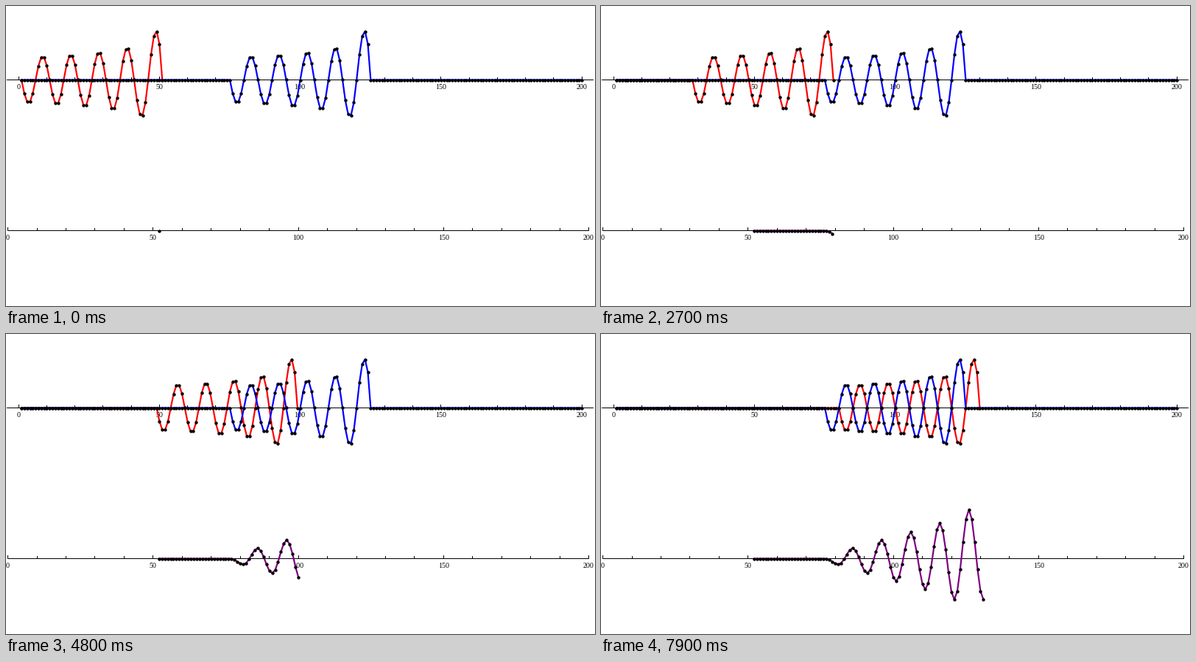
Animation, 800 px wide and 408 px high, one loop 8 s. Source, as a matplotlib script:

```python
import numpy as np
import matplotlib.pyplot as plt
from matplotlib.animation import FuncAnimation

W, H, DPI = 800, 408, 100
FRAMES = 80
PX = 72 / DPI  # points per pixel

TOP, BOTTOM = 100.5, 305.5
TOP_X0, TOP_STEP = 17.2, 3.825
BOT_X0, BOT_STEP = 2.6, 3.945

fig = plt.figure(figsize=(W / DPI, H / DPI), dpi=DPI, facecolor="white")
ax = fig.add_axes([0, 0, 1, 1])
ax.set_xlim(0, W)
ax.set_ylim(H, 0)
ax.axis("off")


def top_x(i):
    return TOP_X0 + TOP_STEP * np.asarray(i)


def bottom_x(i):
    return BOT_X0 + BOT_STEP * np.asarray(i)


def draw_axis(y, to_x, left, right):
    # Coordinates already sit on pixel centres, so snapping stays off
    style = dict(color="black", lw=PX, solid_capstyle="butt",
                 snap=False, zorder=1)
    ax.plot([left, right], [y, y], **style)
    for v in range(0, 201, 10):
        x = np.floor(to_x(v)) + 0.5
        major = v % 50 == 0
        ax.plot([x, x], [y, y - (4.5 if major else 3.5)], **style)
        if major:
            ax.text(x - 0.4, y + 12.1, str(v), ha="center", va="baseline",
                    family="Liberation Serif", size=10 * PX, zorder=1)


def make_curve(color, z):
    line, = ax.plot([], [], color=color, lw=2.2 * PX, zorder=z)
    # A collection keeps the dots at sub-pixel positions
    dots = ax.scatter([], [], s=(4.4 * PX) ** 2, color="black",
                      linewidths=0, zorder=5)
    return line, dots


def set_curve(curve, x, y):
    line, dots = curve
    line.set_data(x, y)
    dots.set_offsets(np.column_stack([x, y]))


# Inspiral-like pulse: amplitude grows as (time left) ** -1/4
n = np.arange(51)
left = 50 - n
amp = np.where(left > 0, np.maximum(left, 1) ** -0.25, 0)
pulse = -amp * np.sin(2 * np.pi * n / 10)

# Sliding product of the moving pulse with the fixed one
corr = np.correlate(pulse, pulse, "full")
corr = np.concatenate([np.zeros(24), corr / corr.max()])

signal = np.zeros(200)
signal[74:125] = pulse

draw_axis(TOP, top_x, 1, 798)
draw_axis(BOTTOM, bottom_x, 2, 792)

red = make_curve("red", 2)
blue = make_curve("blue", 3)
purple = make_curve("purple", 4)
set_curve(blue, top_x(np.arange(1, 201)), TOP - 82.5 * signal)


def update(k):
    moved = np.concatenate([np.zeros(k), pulse])
    set_curve(red, top_x(np.arange(1, 52 + k)), TOP - 82.5 * moved)
    set_curve(purple, bottom_x(52 + np.arange(k + 1)),
              BOTTOM - 66.7 * corr[:k + 1])
    return red + purple


anim = FuncAnimation(fig, update, frames=FRAMES, interval=100,
                     repeat=True, repeat_delay=0)
plt.show()
```
